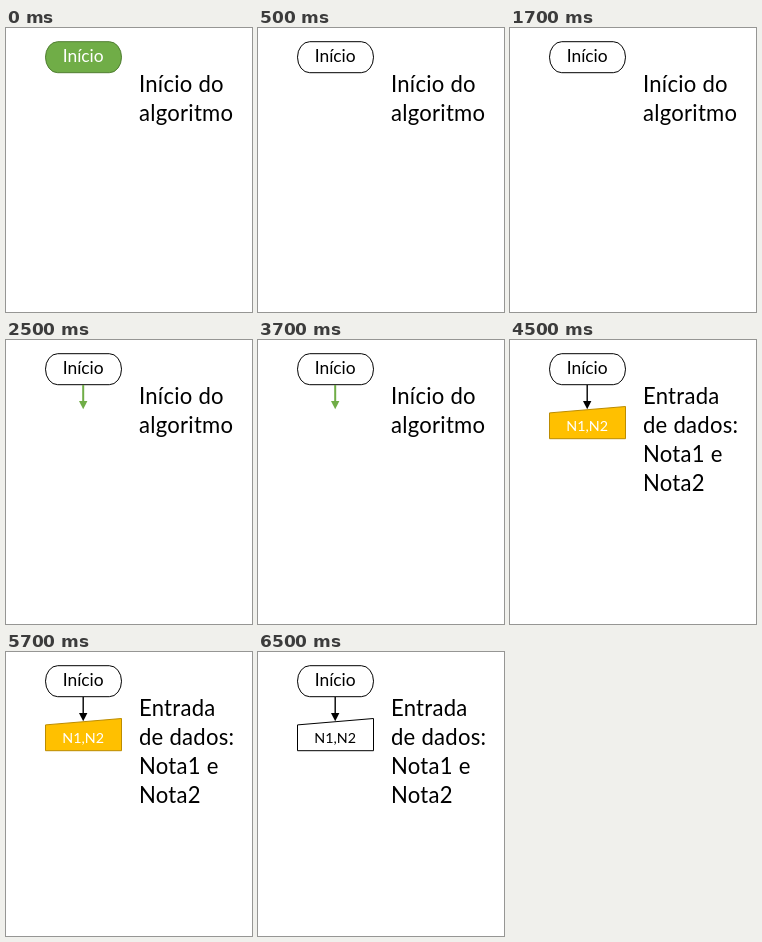
An HTML page that plays this animation: 246x284 px, repeating every 8 s.

```html
<!DOCTYPE html>
<html lang="pt">
<head>
<meta charset="utf-8">
<style>
html, body { margin: 0; width: 100%; height: 100%; overflow: hidden; background: #fff; }
svg { display: block; width: 246px; height: 284px; font-family: Lato, sans-serif; }
.shape { fill: #fff; stroke: #000; }
.label { text-anchor: middle; font-size: 17.4px; }
#note { font-size: 22.1px; letter-spacing: .25px; }
.hide { display: none; }
#start.on .shape { fill: #70ad47; stroke: #507e32; }
#input.on .shape { fill: #ffc000; stroke: #bc8c00; }
.on .label { fill: #fff; }
#arrow { stroke: #000; stroke-width: 1.4; }
#arrow.on { fill: #70ad47; stroke: #70ad47; stroke-width: 2; }
</style>
</head>
<body>
<svg viewBox="0 0 246 284">
  <g id="start">
    <rect class="shape" x="39.5" y="13.7" width="76" height="31" rx="12.2" ry="15.5"/>
    <text class="label" x="77.2" y="34">Início</text>
  </g>
  <g id="arrow">
    <path d="M77.2 45V62"/>
    <path d="M73 61H81.4L77.2 69.3Z" stroke="none"/>
  </g>
  <g id="input">
    <path class="shape" d="M39.5 72.9L115.5 66.5V98.7H39.5Z"/>
    <text class="label" x="77.2" y="91" style="font-size:14.3px">N1,N2</text>
  </g>
  <g id="note"></g>
</svg>
<script>
const $ = id => document.getElementById(id);
const notes = [["Início do", "algoritmo"], ["Entrada", "de dados:", "Nota1 e", "Nota2"]];
const starts = [0, 500, 2500, 4500, 6500];
// each part: step at which it appears, step at which it is highlighted
const parts = { start: [0, 0], arrow: [2, 2], input: [3, 3] };
let shown = -1;

function show(step) {
  for (const [id, [from, lit]] of Object.entries(parts)) {
    $(id).classList.toggle("hide", step < from);
    $(id).classList.toggle("on", step === lit);
  }
  $("note").innerHTML = notes[step < 3 ? 0 : 1]
    .map((line, i) => `<text x="133" y="${63.7 + 29 * i}">${line}</text>`).join("");
}

function tick() {
  const t = performance.now() % 8000;
  const step = starts.filter(s => s <= t).length - 1;
  if (step !== shown) show(shown = step);
  requestAnimationFrame(tick);
}
tick();
</script>
</body>
</html>
```
